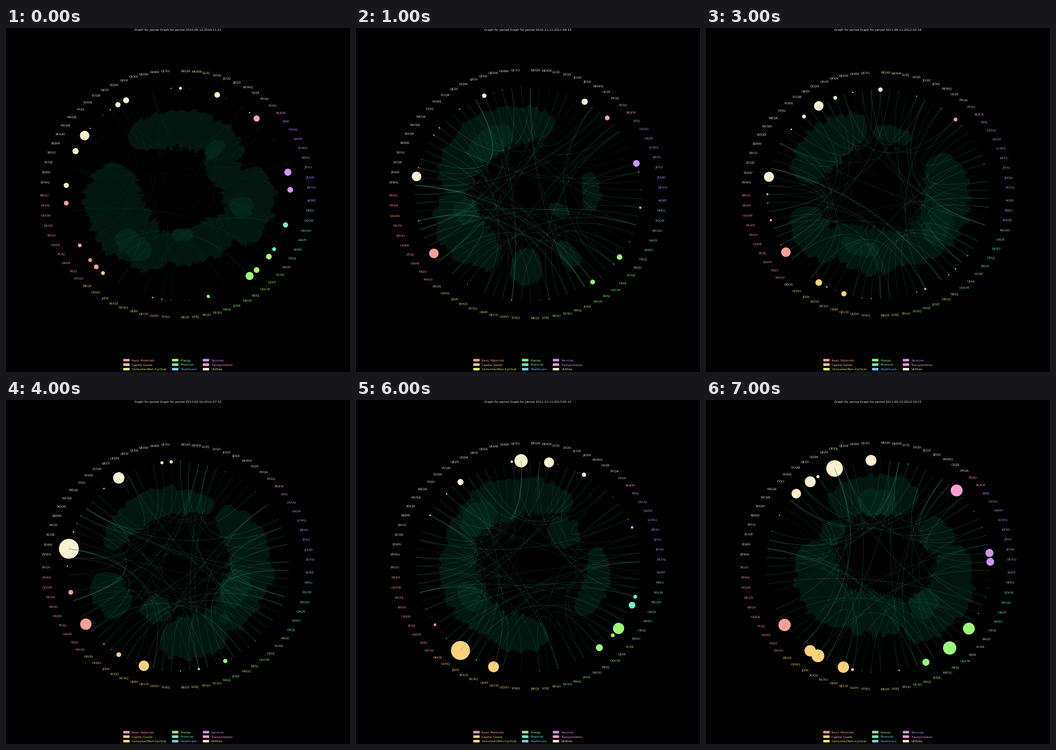
Animation of 748x748 px, one loop 8000 ms. Source, as a matplotlib script:

```python
import numpy as np
import matplotlib.pyplot as plt
from matplotlib.animation import ArtistAnimation
from matplotlib.collections import LineCollection
from matplotlib.patches import Circle, Polygon, Rectangle

SIZE = 748
CENTER = np.array([374.2, 361.5])
SQUASH = 0.945        # height / width of the ring
LABEL_GAP = 1.148     # label ring / node ring
FONT = 10
SHADES = "#011710", "#022418"
LINE = (0.16, 0.62, 0.45)
plt.rcParams["text.hinting"] = "none"

COLORS = {
    "Basic Materials": "#ff9f9a", "Capital Goods": "#ffd27a",
    "Consumer/Non-Cyclical": "#ebf876", "Energy": "#9cff78",
    "Financial": "#72ffc6", "Healthcare": "#82cfff",
    "Services": "#d396ff", "Transportation": "#ff9dd3",
    "Utilities": "#fff0d0",
}

# Counter-clockwise from the right-hand side.
SECTORS = [
    ("Services", "DUVQ JOQD JYVO KEXU LUWQ QAZH UVOQ XIDJ"),
    ("Transportation", "BQEW PYXD"),
    ("Utilities", "FYQA GUJX HOWQ JEXD JUQZ LYQD LUZJ MOXW NEQH "
                  "QUYG QOBH QEDW QYXN QIVH QOJM QEZY VUQB VOHX VYJQ "
                  "WEQK WUXB XOQH XEBW XYGU ZUQE ZOHV ZYWQ"),
    ("Basic Materials", "BEQU DYXH GOQW HUZX KYQO OQEB PUXJ QAHX VEJQ WYQU"),
    ("Capital Goods", "DEQX GYHQ JIXW KOQZ NUXQ OXBY QEUH UQDO YOXQ"),
    ("Consumer/Non-Cyclical", "HEQY LOXJ"),
    ("Energy", "BYQO DUXQ HAQJ JOXE MYQU NEXJ OQUW UJAX VUXE XAQU"),
    ("Financial", "CEQJ DOXU GAQY WUQO"),
    ("Healthcare", "EQOB HIXQ"),
    ("Services", "AQXE"),
]
NODES = [(code, COLORS[s]) for s, codes in SECTORS for code in codes.split()]
N = len(NODES)

fig = plt.figure(figsize=(16, 16), dpi=SIZE / 16, facecolor="#000101")
ax = fig.add_axes([0, 0, 1, 1])
ax.set(xlim=(0, SIZE), ylim=(SIZE, 0))
ax.axis("off")


def place(k, radius):
    """Stage position of node slot k (may be fractional) at a radius."""
    a = (np.asarray(k) + 0.5) * 2 * np.pi / N
    return CENTER + np.stack([radius * np.cos(a),
                              -radius * SQUASH * np.sin(a)], axis=-1)


def chord(a, b):
    """Quadratic curve pulled to the centre of the ring."""
    t = np.linspace(0, 1, 50)[:, None]
    return (1 - t) ** 2 * a + 2 * t * (1 - t) * CENTER + t ** 2 * b


def band(start, end, inner, outer, radius, rng):
    """Ragged ring segment between two node slots, closing at its ends."""
    n = 4 * (end - start)
    k = np.linspace(start, end, n)
    taper = np.sin(np.linspace(0, np.pi, n)) ** 0.3
    mid = (inner + outer) / 2

    def edge(limit):
        steps = np.repeat(rng.uniform(0.75, 1.05, n), 3)[:n]
        reach = taper * (steps + rng.uniform(-0.06, 0.06, n))
        return place(k, radius * (mid + (limit - mid) * reach))

    return np.vstack([edge(outer), edge(inner)[::-1]])


def links(hubs, density, rng):
    """Every node meets one other; hubs gather a handful more."""
    pairs = [(k, k + rng.integers(3, 33)) for k in range(N)
             if rng.random() < density]
    pairs += [(h, h + rng.integers(3, 36)) for h in hubs for _ in range(4)]
    return [(a, b % N) for a, b in pairs]


def specks(big, rng):
    """Tiny dots on some of the nodes without a large one."""
    return {k: 0.4 + 1.2 * rng.random() ** 2 for k in range(N)
            if rng.random() < 0.35 and k not in big}


def scene(seed, period, radius, dots, bands, cores, hubs=(), density=0.8, glow=1):
    rng = np.random.default_rng(seed)
    pos = place(np.arange(N), radius)
    arts = []
    for group, shade in zip((bands, cores), SHADES):
        for b in group:
            arts.append(ax.add_patch(Polygon(band(*b, radius, rng), fc=shade,
                                             lw=0, zorder=1)))
    for k, r in {**specks(dots, rng), **dots}.items():
        arts.append(ax.add_patch(Circle(pos[k], 1.03 * r, fc=NODES[k][1],
                                        lw=0, zorder=2)))
    pairs = links(hubs, density, rng)
    tints = [(*LINE, glow * rng.uniform(0.2, 0.6)) for _ in pairs]
    arts.append(ax.add_collection(LineCollection(
        [chord(pos[a], pos[b]) for a, b in pairs],
        colors=tints, linewidths=0.85, zorder=3)))
    labels = place(np.arange(N), radius * LABEL_GAP)
    for (code, color), (x, y) in zip(NODES, labels):
        arts.append(ax.text(x, y, code, color=color, size=FONT,
                            family="DejaVu Serif",
                            ha="left" if x > CENTER[0] else "right",
                            va="bottom" if y < CENTER[1] - 0.01 else "top"))
    arts.append(ax.text(SIZE / 2, 5.3, f"Graph for period Graph for period {period}",
                        color="white", size=FONT, family="DejaVu Sans",
                        ha="center", va="baseline"))
    return arts


def blend(a, b):
    """Dot sizes halfway between two periods."""
    sizes = {k: (a.get(k, 0) + b.get(k, 0)) / 2 for k in {**a, **b}}
    return {k: r for k, r in sizes.items() if r > 2}


def legend():
    for i, (name, color) in enumerate(COLORS.items()):
        x = (255.3, 361.4, 428.2)[i // 3]
        y = 722.2 + 9.8 * (i % 3)
        ax.add_patch(Rectangle((x, y - 2.3), 13, 4.6, color=color, lw=1,
                               snap=False))
        ax.text(x + 18.2, y + 2.4, name, color=color, size=FONT,
                family="DejaVu Sans", va="baseline")


# Notable dots per period: node slot -> radius in pixels.
jun10 = {30: 10, 64: 8.5, 2: 7.5, 9: 6.5, 32: 6.5, 24: 6.3, 0: 6, 14: 6, 67: 6,
         65: 6, 25: 5.5, 36: 5.5, 71: 5.5, 46: 5, 38: 5, 47: 4, 45: 4, 43: 4,
         68: 4, 59: 3.5, 18: 3}
nov10 = {35: 10, 44: 10, 3: 7, 12: 6.5, 67: 5.8, 9: 5, 63: 5, 23: 4.7, 73: 2.5}
apr11 = {18: 9.3, 49: 9, 23: 8, 25: 8, 27: 8, 44: 8, 9: 8, 37: 4.5, 5: 2.8,
         3: 2.5, 63: 2.5}
feb12 = {35: 21, 25: 12, 44: 12, 52: 11, 40: 5, 49: 5, 61: 4.5, 19: 3.5, 20: 3.3,
         58: 2.5}
dec12 = {48: 20, 19: 14, 67: 11.8, 52: 11.5, 16: 10.5, 64: 7.3, 70: 7, 26: 6.5,
         12: 4.5, 66: 4, 71: 4, 44: 2.8, 4: 2.8, 20: 2.5}
may13 = {23: 17.5, 64: 14, 49: 13.5, 44: 13, 9: 12.5, 67: 12.5, 48: 12, 52: 12,
         19: 11.5, 26: 11.5, 28: 10, 1: 8.5, 0: 8.2, 61: 7.5, 25: 3.3, 53: 3}

# Shaded bands: first slot, last slot, inner and outer share of the radius.
apr11_bands = [(20, 35, .45, .88), (12, 19, .5, .68), (39, 49, .5, .88),
               (45, 63, .3, .78), (60, 82, .38, .85)]
apr11_cores = [(65, 72, .5, .75), (48, 56, .45, .62)]
dec12_bands = [(11, 34, .45, .87), (5, 13, .3, .6), (31, 52, .42, .82),
               (49, 59, .45, .84), (65, 78, .5, .75)]
dec12_cores = [(24, 31, .5, .78), (40, 46, .5, .7)]

legend()
scenes = [
    scene(1, "2010-06-12-2010-11-11", 244, jun10,
          [(6, 27, .42, .82), (1, 11, .3, .65), (66, 79, .38, .9),
           (51, 69, .3, .7), (31, 54, .28, .86)],
          [(9, 12, .4, .65), (44, 51, .5, .75), (70, 74, .45, .7), (54, 60, .32, .45)],
          density=0.5, glow=0.35),
    scene(2, "2010-11-11-2011-04-12", 245.9, nov10,
          [(14, 37, .44, .88), (37, 51, .44, .9), (53, 58, .48, .86),
           (71, 79, .47, .65), (61, 64, .52, .82), (66, 71, .2, .42)],
          [(21, 30, .45, .74), (38, 43, .45, .68)], hubs=(36, 40, 24)),
    scene(3, "2011-04-12-2011-09-11", 245.2, apr11, apr11_bands, apr11_cores,
          hubs=(34, 40, 66)),
    scene(4, "2011-09-11-2012-02-10", 240.7, blend(apr11, feb12), apr11_bands,
          apr11_cores, hubs=(34, 66, 71)),
    scene(5, "2012-02-10-2012-07-12", 240.8, feb12,
          [(12, 34, .47, .78), (60, 86, .42, .87), (53, 63, .46, .93),
           (38, 46, .48, .85), (47, 54, .3, .6)],
          [(66, 74, .42, .7), (63, 65, .6, .7)], hubs=(71, 35, 16)),
    scene(6, "2012-07-12-2012-12-11", 245.8, blend(feb12, dec12), dec12_bands,
          dec12_cores, hubs=(71, 31, 16)),
    scene(7, "2012-12-11-2013-05-12", 243.2, dec12, dec12_bands, dec12_cores,
          hubs=(31, 40, 19)),
    scene(8, "2013-05-12-2013-10-11", 244.1, may13,
          [(12, 26, .46, .9), (26, 32, .4, .62), (32, 51, .3, .78),
           (45, 63, .22, .68), (60, 78, .45, .9), (2, 9, .45, .75)],
          [(15, 22, .46, .74), (63, 69, .4, .68)], hubs=(35, 16, 23)),
]
anim = ArtistAnimation(fig, scenes, interval=1000, repeat=True)
plt.show()
```
